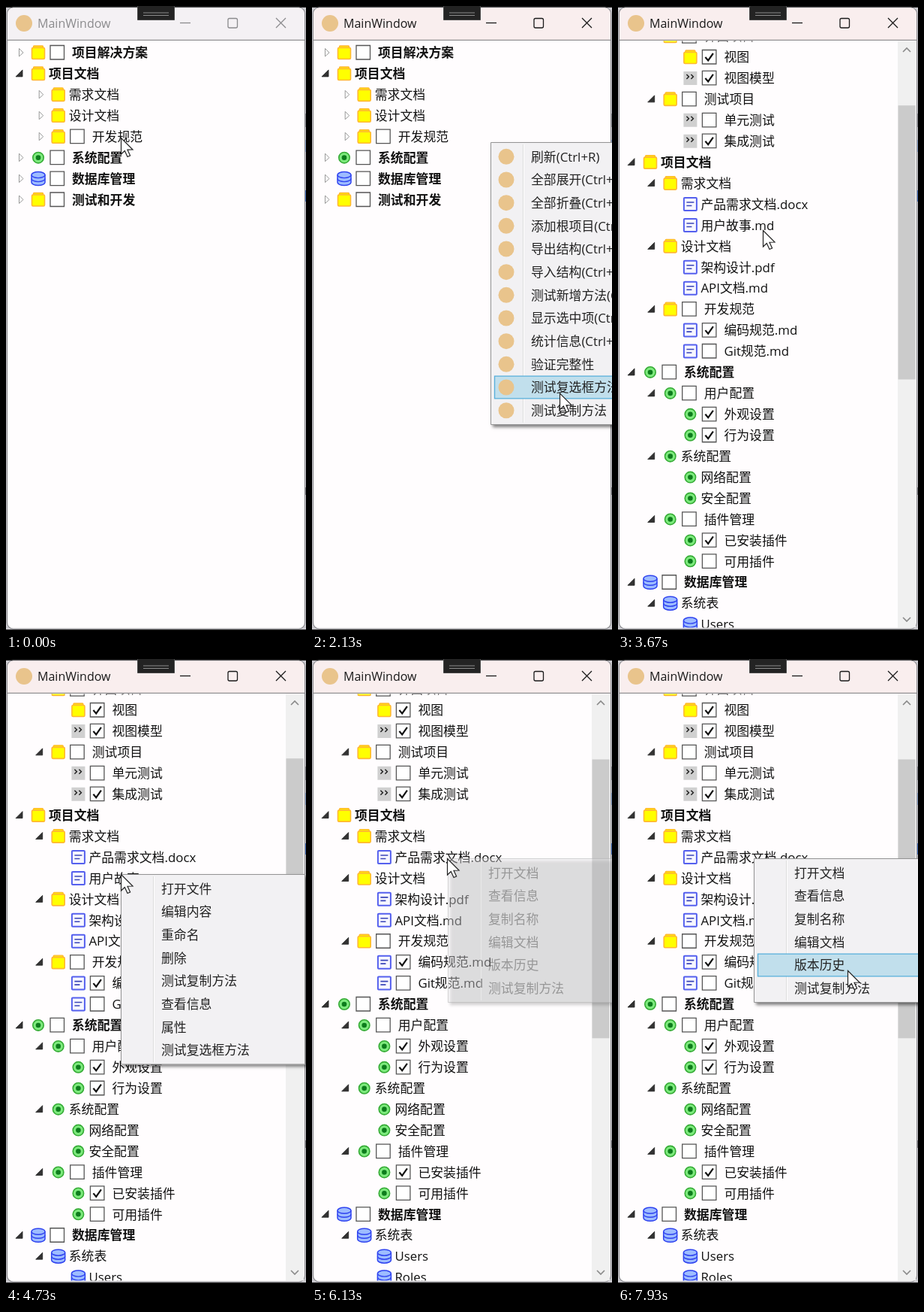
Write an HTML page with a canvas that moves like this. It is 400 px wide and 831 px high and loops after 8000 ms.

```html
<!DOCTYPE html>
<html lang="zh-CN">
<head>
<meta charset="utf-8">
<style>
html, body { margin: 0; height: 100%; overflow: hidden; background: #fff; }
canvas { display: block; }
</style>
</head>
<body>
<canvas id="stage" width="400" height="831"></canvas>
<script>
const ctx = document.getElementById('stage').getContext('2d');
const LOOP = 8000, ROW = 27.93, ITEM = 30.67, INDENT = 26.7;
const FONT = '"Open Sans", "Noto Sans CJK SC", "Noto Sans CJK", sans-serif';
const TAN = '#e9c48c';

// level, icon (f folder, c code, d document, g gear, b database), check (- none, o empty, x ticked), label
const parse = list => list.split('|').map(s => ({ level: +s[0], icon: s[1], check: s[2], label: s.slice(3) }));
const tree = parse('0fo项目解决方案|1fo核心项目|2fx模型|2cx服务|1fo界面项目|2fx视图|2cx视图模型|' +
  '1fo测试项目|2co单元测试|2cx集成测试|0f-项目文档|1f-需求文档|2d-产品需求文档.docx|2d-用户故事.md|' +
  '1f-设计文档|2d-架构设计.pdf|2d-API文档.md|1fo开发规范|2dx编码规范.md|2doGit规范.md|' +
  '0go系统配置|1go用户配置|2gx外观设置|2gx行为设置|1g-系统配置|2g-网络配置|2g-安全配置|' +
  '1go插件管理|2gx已安装插件|2go可用插件|0bo数据库管理|1b-系统表|2b-Users|2b-Roles|0fo测试和开发');
const FULL_COUNT = 56;
const collapsed = [0, 10, 11, 14, 17, 20, 30, 34].map(i => tree[i]);
const afterDelete = tree.filter(n => n.label !== '用户故事.md');

const menus = [
  { x: 238, y: 181, w: 215, from: 1150, to: 2995, icons: true, items: ('刷新(Ctrl+R)|全部展开(Ctrl+E)|全部折叠(Ctrl+W)|' +
    '添加根项目(Ctrl+N)|导出结构(Ctrl+S)|导入结构(Ctrl+O)|测试新增方法(Ctrl+T)|显示选中项(Ctrl+D)|' +
    '统计信息(Ctrl+I)|验证完整性|测试复选框方法|测试复制方法').split('|') },
  { x: 153, y: 286, w: 246, from: 4190, to: 5470,
    items: '打开文件|编辑内容|重命名|删除|测试复制方法|查看信息|属性|测试复选框方法'.split('|') },
  { x: 181, y: 265, w: 240, from: 6075, to: LOOP,
    items: '打开文档|查看信息|复制名称|编辑文档|版本历史|测试复制方法'.split('|') }
];

// time, x, y of the pointer tip
const path = [
  [0, 153, 175], [180, 110, 95], [330, 70, 55], [480, 36, 105], [620, 42, 205], [740, 85, 240], [870, 163, 215],
  [1090, 238, 181], [1230, 238, 181], [1440, 267, 207], [1540, 267, 207], [1850, 300, 400], [2120, 330, 515],
  [2600, 352, 276], [2670, 354, 268], [2740, 358, 226], [3270, 358, 226], [3640, 193, 298], [3740, 193, 298],
  [4070, 153, 286], [4730, 153, 286], [5000, 205, 312], [5370, 223, 388], [5600, 223, 388], [6030, 180, 265],
  [6470, 180, 265], [6800, 262, 300], [7130, 287, 335], [7260, 287, 335], [7340, 300, 356],
  [7530, 300, 356], [7880, 306, 414], [LOOP, 306, 414]
];

function pointerAt(t) {
  const i = Math.max(1, path.findIndex(p => p[0] > t));
  const [a, b] = [path[i - 1], path[i]];
  const u = (t - a[0]) / (b[0] - a[0]), e = u * u * (3 - 2 * u);
  return [a[1] + (b[1] - a[1]) * e, a[2] + (b[2] - a[2]) * e];
}

function box(x, y, w, h, fill, stroke, width = 1, radius = 0) {
  ctx.beginPath();
  ctx.roundRect(x, y, w, h, radius);
  paint(fill, stroke, width);
}
function disc(x, y, r, fill, stroke, width) {
  ctx.beginPath();
  ctx.arc(x, y, r, 0, 7);
  paint(fill, stroke, width);
}
function poly(points, fill, stroke, width = 1, close = true) {
  ctx.beginPath();
  for (let i = 0; i < points.length; i += 2) ctx.lineTo(points[i], points[i + 1]);
  if (close) ctx.closePath();
  paint(fill, stroke, width);
}
function line(x1, y1, x2, y2, color, width = 1) {
  poly([x1, y1, x2, y2], null, color, width, false);
}
function paint(fill, stroke, width) {
  if (fill) { ctx.fillStyle = fill; ctx.fill(); }
  if (stroke) { ctx.strokeStyle = stroke; ctx.lineWidth = width; ctx.stroke(); }
}
function text(s, x, y, color = '#111', bold = false, size = 16.85) {
  ctx.font = `${bold ? 'bold ' : ''}${size}px ${FONT}`;
  ctx.fillStyle = color;
  ctx.fillText(s, x, y);
}

const icons = {
  f() {
    box(-6.5, -9, 13, 5, '#ffe800', '#ffb733', 1.4, 1);
    box(-8.5, -6.5, 17, 15, '#ffff00', '#ffb733', 1.6, 1.5);
  },
  c() {
    box(-9, -9, 18, 18, '#d0d0d0');
    for (const x of [-5, 1]) poly([x, -5, x + 3, -2, x, 1], null, '#222', 1.5, false);
  },
  d() {
    box(-8.5, -8.5, 17, 17, '#f6f6ff', '#5560ee', 2, 1);
    line(-5, -2.5, 5, -2.5, '#3a45b8', 1.6);
    line(-5, 2, 2, 2, '#3a45b8', 1.6);
  },
  g() {
    disc(0, 0, 7.2, '#7dea7d', '#35ab35', 1.6);
    disc(0, 0, 3.3, '#0d7d1c');
  },
  b() {
    ctx.beginPath();
    ctx.ellipse(0, -5, 9, 4, 0, Math.PI, 0);
    ctx.lineTo(9, 5);
    ctx.ellipse(0, 5, 9, 4, 0, 0, Math.PI);
    ctx.closePath();
    paint('#9dbcff', '#2f43f0', 1.5);
    for (const y of [-5, 0]) {
      ctx.beginPath();
      ctx.ellipse(0, y, 9, 4, 0, 0, Math.PI);
      paint(null, '#2f43f0', 1.4);
    }
  }
};

function drawNode(node, y, open) {
  const x = node.level * INDENT;
  if (node.level < 2) {
    if (open) poly([x + 22, y - 5, x + 22, y + 4, x + 13, y + 4], '#333', '#222', 0.8);
    else poly([x + 17.5, y - 5.5, x + 17.5, y + 5, x + 23, y], '#fff', '#999');
  }
  ctx.save();
  ctx.translate(x + 43, y);
  icons[node.icon]();
  ctx.restore();
  const checkable = node.check !== '-';
  if (checkable) box(x + 59, y - 9.5, 18.5, 18.5, '#fff', '#555', 1.3);
  if (node.check === 'x') poly([x + 63, y, x + 66.8, y + 4.5, x + 73.5, y - 5], null, '#111', 2.2, false);
  text(node.label, x + (checkable ? 88 : 57), y + 6.2, '#111', node.level === 0);
}

function drawTree(t) {
  const expanded = t >= 3060, deleted = t >= 5500;
  const rows = !expanded ? collapsed : deleted ? afterDelete : tree;
  const notches = [3320, 3400, 3480].filter(s => t >= s).length;
  const offset = notches * 44.55;
  ctx.save();
  ctx.beginPath();
  ctx.rect(3, 46.5, 394, 780);
  ctx.clip();
  rows.forEach((node, i) => drawNode(node, 62 + i * ROW - offset, expanded || node.label === '项目文档'));
  if (expanded) {
    const extent = (FULL_COUNT - deleted) * ROW + 8;
    box(373, 46, 24, 781, '#f0f0f0');
    box(373.5, 70 + 733 * offset / extent, 23, 733 * 781 / extent, '#cbcbcb');
    poly([380, 61, 385, 56, 390, 61], null, '#8a8a8a', 1.6, false);
    poly([380, 813, 385, 818, 390, 813], null, '#8a8a8a', 1.6, false);
  }
  ctx.restore();
}

function drawMenu(menu, t, px, py) {
  if (t < menu.from || t >= menu.to) return;
  const { x, y, w, items } = menu, h = items.length * ITEM + 8;
  ctx.save();
  ctx.globalAlpha = Math.min(1, (t - menu.from) / 150);
  ctx.shadowColor = 'rgba(0,0,0,.5)';
  ctx.shadowBlur = 4;
  ctx.shadowOffsetX = ctx.shadowOffsetY = 2.5;
  box(x, y, w, h, '#f2f1f3');
  ctx.shadowColor = 'transparent';
  box(x + 0.5, y + 0.5, w - 1, h - 1, null, '#949494');
  line(x + 43.5, y + 3, x + 43.5, y + h - 3, '#dcdcdc');
  line(x + 44.5, y + 3, x + 44.5, y + h - 3, '#fff');
  const inside = px > x + 4 && px < x + w - 4;
  const hot = inside ? Math.floor((py - y - 4) / ITEM) : -1;
  items.forEach((label, i) => {
    const top = y + 4 + i * ITEM, mid = top + ITEM / 2;
    if (i === hot) box(x + 5.5, top + 0.5, w - 11, ITEM - 1, '#c1dfec', '#55aeda', 1.3);
    if (menu.icons) disc(x + 21, mid, 10.5, TAN);
    text(label, x + 54, mid + 6.2, '#222');
  });
  ctx.restore();
}

function drawWindow(active) {
  box(0, 0, 400, 831, '#c9c8cd');
  box(0, 0, 400, 2, '#111');
  box(0, 829, 400, 2, '#111');
  box(397.5, 143, 2.5, 18, '#8c8c92');
  box(397.5, 178, 2.5, 16, '#8aa6cf');
  box(397.5, 245, 2.5, 15, '#3f6fc4');
  box(397.5, 640, 2.5, 10, '#77777c');
  box(1.5, 2, 397, 826, '#fffdfe', '#89898d', 1.2, 8);
  box(2, 2.5, 396, 42.5, active ? '#f9eeee' : '#f4f1f4', null, 1, [8, 8, 0, 0]);
  line(2, 45.3, 398, 45.3, '#77777a');
  disc(24, 23, 11, TAN);
  const ink = active ? '#1a1a1a' : '#8b8b8d';
  text('MainWindow', 42, 29, ink, false, 16);
  line(232, 22.5, 246, 22.5, ink, 1.3);
  box(296, 16.5, 12.5, 12.5, null, ink, 1.3, 2);
  line(360, 16, 373, 29, ink, 1.3);
  line(373, 16, 360, 29, ink, 1.3);
  box(175.5, -1, 49, 19.5, '#232323', '#4a4a4a');
  line(183, 9, 217, 9, '#8c8c8c');
  line(183, 12.5, 217, 12.5, '#8c8c8c');
}

function drawPointer(x, y) {
  ctx.save();
  ctx.translate(x, y);
  poly([0.5, 0.5, 0.5, 22, 5.3, 17.5, 9, 25.5, 12.6, 24, 9, 16.2, 16, 16], '#fff', '#222', 1.2);
  ctx.restore();
}

function frame(now) {
  const t = now % LOOP, [px, py] = pointerAt(t);
  drawWindow(t >= 1090);
  drawTree(t);
  menus.forEach(menu => drawMenu(menu, t, px, py));
  drawPointer(px, py);
  requestAnimationFrame(frame);
}
requestAnimationFrame(frame);
</script>
</body>
</html>
```
